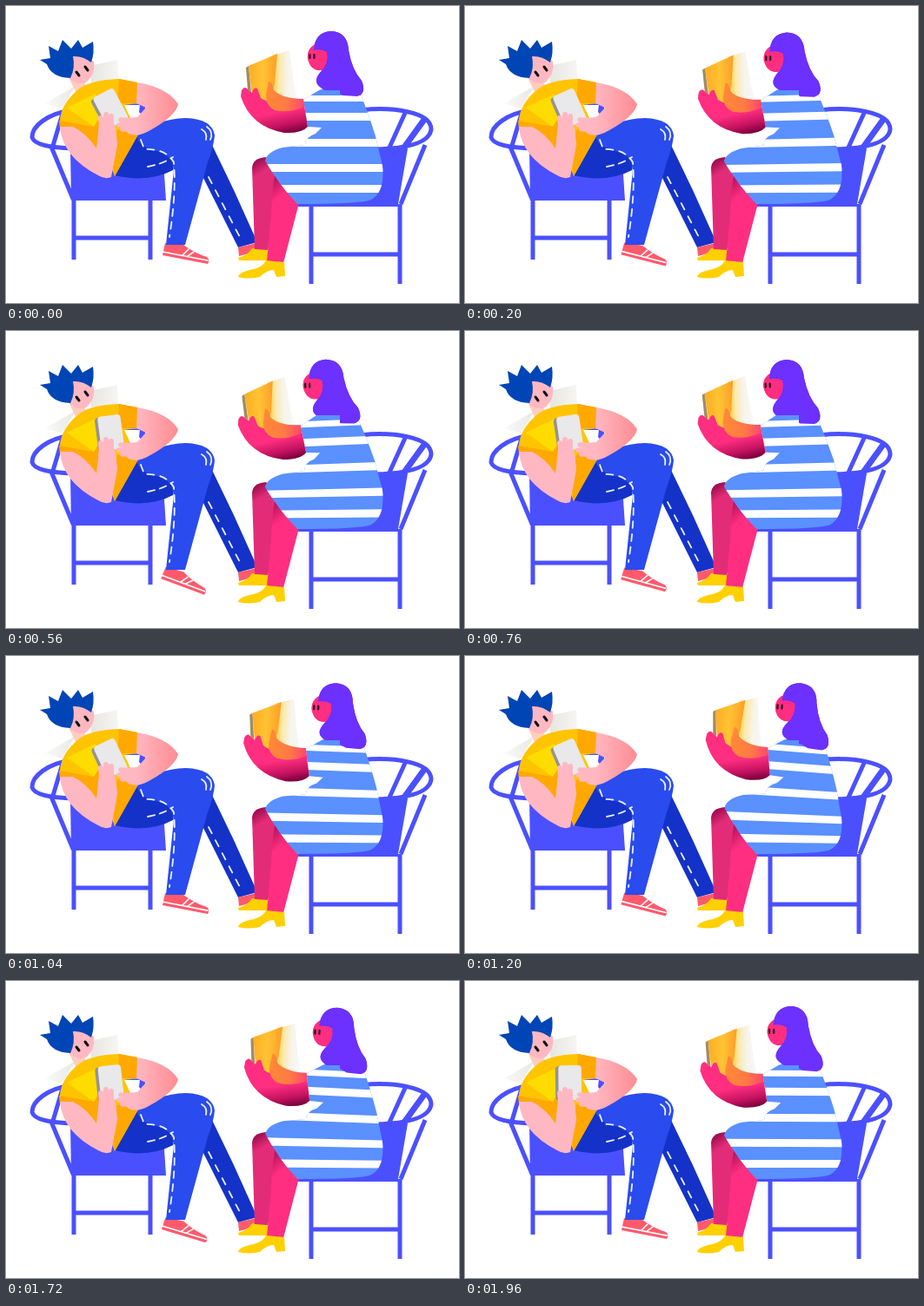
Animation of 521 by 342 pixels, one loop 2000 ms. Source, as an HTML page:

```html
<!DOCTYPE html>
<html lang="en">
<head>
<meta charset="utf-8">
<title>Two readers</title>
<style>
html, body { margin: 0; width: 100%; height: 100%; overflow: hidden; background: #fff; }
svg { display: block; width: 521px; height: 342px; }
.line { fill: none; stroke-linecap: round; stroke-linejoin: round; }
.chair { fill: none; stroke: #4b50ff; stroke-width: 5; }
.seam { fill: none; stroke: #e8f0ff; stroke-width: 1.8; stroke-linecap: round; }
</style>
</head>
<body>
<svg viewBox="0 0 521 342">
<defs>
  <linearGradient id="skin"><stop offset=".25" stop-color="#ffb8c2"/><stop offset="1" stop-color="#ff8c92"/></linearGradient>
  <linearGradient id="page"><stop stop-color="#ffad22"/><stop offset=".5" stop-color="#ffc334"/><stop offset="1" stop-color="#ff9d28"/></linearGradient>
  <linearGradient id="glow"><stop stop-color="#ffbd0a"/><stop offset=".35" stop-color="#ffd34c" stop-opacity=".5"/><stop offset=".65" stop-color="#d8cc98" stop-opacity=".2"/><stop offset="1" stop-color="#a8a595" stop-opacity=".06"/></linearGradient>
  <linearGradient id="hazeR"><stop stop-color="#8c8870" stop-opacity=".22"/><stop offset="1" stop-color="#8c8870" stop-opacity=".08"/></linearGradient>
  <linearGradient id="hazeL"><stop stop-color="#8c8870" stop-opacity=".04"/><stop offset="1" stop-color="#8c8870" stop-opacity=".2"/></linearGradient>
  <linearGradient id="arm" x1=".5" y1=".3" x2=".7" y2="1"><stop offset=".35" stop-color="#ff2e80"/><stop offset=".75" stop-color="#c3125f"/><stop offset="1" stop-color="#7c003e"/></linearGradient>
  <linearGradient id="thumb"><stop stop-color="#ff8a35"/><stop offset=".55" stop-color="#ff7a45"/><stop offset="1" stop-color="#ff4670"/></linearGradient>
  <linearGradient id="farLeg" x1="0" y1="0" x2=".25" y2="1"><stop stop-color="#82003f"/><stop offset=".22" stop-color="#e32c78"/><stop offset="1" stop-color="#e32c78"/></linearGradient>
  <linearGradient id="nearLeg" gradientUnits="userSpaceOnUse" x1="306" y1="194" x2="322" y2="214"><stop stop-color="#a50d54"/><stop offset="1" stop-color="#ff2e80"/></linearGradient>
  <clipPath id="dressClip"><path data-d="M360 97 Q370 93 385 93 L408 102 Q417 124 425 150 L433 184 Q436 214 420 223 Q408 228 335 228 Q314 206 298 178 Q300 168 318 163 L344 160 Q344 151 356 147 L363 140 L347 139 L342 108 Z"/></clipPath>
</defs>

<!-- left chair -->
<g class="chair">
  <path d="M160 115 Q110 113 75 120 C48 124 30 138 30 151 C32 160 52 163 78 164"/>
  <path d="M52 162 L77 222 M65 124 L54 161 M78 222 V292 M166 222 V292 M78 267 H166"/>
</g>
<path fill="#4b50ff" d="M74 164 H180 L184 224 H75 Z"/>
<path fill="#fff" d="M134 114 H157 V128 H134 Z"/>
<path fill="#4b50ff" d="M154 113 L160 114 V130 L153 122 Z"/>

<!-- man -->
<path fill="url(#hazeR)" d="M96 69 L128 62 L129 85 L98 88 Z"/>
<path fill="url(#hazeL)" d="M45 112 L80 92 L64 118 Z"/>
<path fill="#1432c8" d="M222 188 L236 158 L262 212 L289 272 L267 278 Z"/>
<path fill="#ff5a6c" d="M267 278 L288 273 L290 282 L268 288 Z"/>
<path class="seam" stroke-dasharray="8 9" d="M233 197 L272 272"/>
<path fill="#1432c8" d="M125 195 L150 149 L196 160 L192 189 Q164 204 125 195 Z"/>
<g id="shoe">
  <path fill="#ff5a6c" d="M183 273 L204 275 Q218 285 231 289 Q235 292 232 297 L180 287 Z"/>
  <path class="line" stroke="#fff" stroke-width="1.6" d="M180 283 L232 293 M203 287 L210 280 M209 288 L216 283"/>
</g>
<path fill="#2a4bee" d="M150 150 Q172 130 207 129 Q237 130 240 149 Q239 161 232 180 L206 275 L184 275 L192 198 Q197 170 168 166 Q154 162 150 150 Z"/>
<path class="seam" stroke-dasharray="8 7" d="M155 154 L159 165 Q184 164 193 180 Q196 215 188 266"/>
<path class="seam" stroke-dasharray="8 6" d="M163 185 Q180 182 192 174"/>
<path class="seam" d="M225 142 Q232 146 230 154 M231 139 Q239 145 235 154"/>

<path fill="#ffcdbd" d="M73 84 L90 88 L94 95 L80 99 Z"/>
<path fill="#ffb8c2" d="M76 57 Q90 54 101 64 Q103 79 92 88 Q84 92 73 84 Z"/>
<path fill="#0045b5" d="M39 62 L51 60 L49 46 L60 52 L65 39 L75 49 L83 39 L88 48 L100 41 Q102 54 98 65 Q88 57 77 58 Q80 71 74 83 Q52 82 47 67 Z"/>
<path class="line" stroke="#101010" stroke-width="3" d="M81 76 L84 80 M91 70 L94 74"/>

<path fill="#ffc400" d="M81 98 Q94 85 130 84 L151 88 V112 L136 114 L152 148 L125 196 L104 140 L62 139 Q60 116 81 98 Z"/>
<path fill="#ffdc00" d="M70 117 L103 101 L108 128 L101 139 Z"/>
<path fill="#ffa800" d="M130 84 L151 88 V112 L128 112 Z M61 132 L101 139 L108 128 V166 H90 L62 141 Z M128 142 L152 148 L125 196 L122 180 Z"/>
<path fill="url(#skin)" d="M151 88 Q186 94 198 113 Q195 127 166 143 Q151 152 141 147 L133 139 L136 129 L151 128 L161 117 L150 112 Z"/>
<path fill="#ffb8c2" d="M62 139 H77 Q92 146 104 164 L107 139 L126 140 L128 160 L121 197 Q114 200 106 195 Q65 174 62 139 Z"/>

<g id="phone">
  <rect x="104" y="98" width="24" height="39" rx="4" fill="#97938c"/>
  <rect x="107.5" y="97" width="26.5" height="40" rx="4" fill="#e9e8ea"/>
</g>
<path class="line" stroke="#ffb8c2" stroke-width="6" d="M111 146 L109 129 M115 146 L115 125 M121 147 L121 127"/>
<path fill="#ffb8c2" d="M107 136 H125 L128 159 H105 Z"/>
<path class="line" stroke="#ffb8c2" stroke-width="5.5" d="M147 132 L132 131 M147 137 L130 137 M147 141 L134 142"/>

<!-- right chair -->
<g class="chair">
  <path d="M408 120 C442 116 489 121 489 142 C487 158 460 164 425 165"/>
  <path d="M460 121 L440 165 M482 160 L454 228 M351 228 V320 M453 228 V320 M351 286 H453"/>
  <path stroke-width="7" d="M483 128 L457 164"/>
</g>
<path fill="#4b50ff" d="M420 164 H462 L451 228 L456 231 H335 V220 Z"/>

<!-- woman -->
<path fill="#ffd000" d="M283 279 L301 280 L302 293 H268 L267 290 Q278 287 283 279 Z"/>
<path fill="url(#farLeg)" d="M283 186 Q284 175 299 174 L326 203 L301 281 L286 280 Z"/>
<path fill="url(#nearLeg)" d="M312 183 L338 223 L319 296 L300 294 L305 240 Q306 204 312 183 Z"/>
<path fill="#ffd000" d="M299 293 L320 295 L321 311 L311 312 L308 304 Q300 304 292 312 Q278 315 267 312 Q268 306 285 303 Q296 300 299 293 Z"/>

<g id="head">
  <path fill="#ff2e80" d="M358 43 Q346 48 347 60 Q350 75 363 74 Q372 70 370 50 Z"/>
  <path class="line" stroke="#26101c" stroke-width="2.2" d="M349.5 56 V60 M354.5 56 V60"/>
  <path fill="#6c30ff" d="M354 51 Q355 30 374 29 Q393 30 394 51 Q398 74 409 86 Q415 101 404 104 L388 103 L380 99 Q368 100 361 93 Q353 87 361 77 Q372 66 369 53 Q362 49 354 51 Z"/>
</g>
<g clip-path="url(#dressClip)">
  <path fill="#5a90ff" d="M280 80 H450 V240 H280 Z"/>
  <g id="stripes" fill="#fff"></g>
</g>
<use href="#head" clip-path="url(#hairSide)"/>
<g id="reach">
  <path fill="url(#glow)" d="M306 57 L326 51 L331 88 L335 106 L303 108 Z"/>
  <path fill="url(#page)" d="M279 69 L312 55 L309 90 L301 112 L284 110 Z"/>
  <path fill="#a38b62" d="M276 71 L279 69 L282 99 L278 96 Z"/>
  <path fill="url(#arm)" d="M271 97 Q274 92 277 95 L283 100 Q285 93 289 95 L293 106 Q306 116 342 108 L347 139 Q340 147 320 146 Q281 139 270 104 Z"/>
  <path fill="url(#thumb)" d="M302 87 Q306 86 308 97 Q318 107 342 107 L343 116 Q325 124 309 120 Q299 115 299 103 Z"/>
</g>
<defs><clipPath id="hairSide"><path d="M330 20 H440 V120 H384 V97 H330 Z"/></clipPath></defs>
</svg>
<script>
const LOOP = 2000, PIVOT = [370, 185];
const el = id => document.getElementById(id);
const lean = [[0, 0], [360, -2.2], [760, -1.7], [1040, 2.1], [1400, 6.4], [1720, 2.7]];
const nod = [[0, 0], [360, 3], [760, 4], [1040, 2], [1400, 1.3], [1720, 1.5]];
const tilt = [[0, -28], [40, -25], [360, -22], [400, -9], [740, -6], [840, -17], [960, 0], [1000, -28]];

// Smooth periodic curve through the keys.
function curve(keys, t) {
  const n = keys.length;
  const key = i => {
    const turn = Math.floor(i / n), [x, y] = keys[i - turn * n];
    return [x + turn * LOOP, y];
  };
  const slope = i => (key(i + 1)[1] - key(i - 1)[1]) / (key(i + 1)[0] - key(i - 1)[0]);
  let i = 0;
  while (key(i + 1)[0] <= t) i++;
  const [x0, y0] = key(i), [x1, y1] = key(i + 1), h = x1 - x0, u = (t - x0) / h;
  const s = u * u * (3 - 2 * u);
  return y0 + (y1 - y0) * s + h * u * (1 - u) * (slope(i) * (1 - u) - slope(i + 1) * u);
}

function linear(keys, t) {
  const i = keys.findIndex(k => k[0] > t), [x0, y0] = keys[i - 1], [x1, y1] = keys[i];
  return y0 + (y1 - y0) * (t - x0) / (x1 - x0);
}

// Bend a path about the hips; the lap stays put.
function bend(d, angle) {
  return d.replace(/(-?[\d.]+) (-?[\d.]+)/g, (_, a, b) => {
    const w = Math.min(1, Math.max(0, (228 - b) / 85));
    const r = angle * w * Math.PI / 180, x = a - PIVOT[0], y = b - PIVOT[1];
    const c = Math.cos(r), s = Math.sin(r);
    return `${(PIVOT[0] + x * c - y * s).toFixed(2)} ${(PIVOT[1] + x * s + y * c).toFixed(2)}`;
  });
}

el('stripes').innerHTML = [[103, 110], [123, 132], [153, 162], [182, 191], [206, 215]]
  .map(([a, b]) => `<path data-d="M280 ${a} L450 ${a} L450 ${b} L280 ${b} Z"/>`).join('');
const bent = document.querySelectorAll('[data-d]');

function draw(now) {
  const t = now % LOOP, angle = curve(lean, t);
  const turn = `rotate(${angle} ${PIVOT})`;
  bent.forEach(p => p.setAttribute('d', bend(p.dataset.d, angle)));
  el('reach').setAttribute('transform', turn);
  el('head').setAttribute('transform', `translate(0 ${curve(nod, t)}) ${turn}`);
  el('phone').setAttribute('transform', `rotate(${linear(tilt, t % 1000)} 122 118)`);
  el('shoe').setAttribute('transform', `rotate(${10 * Math.sin(Math.PI * t / 1000) ** 2} 190 276)`);
}

const start = performance.now();
function tick() {
  draw(performance.now() - start);
  requestAnimationFrame(tick);
}
tick();
</script>
</body>
</html>
```
